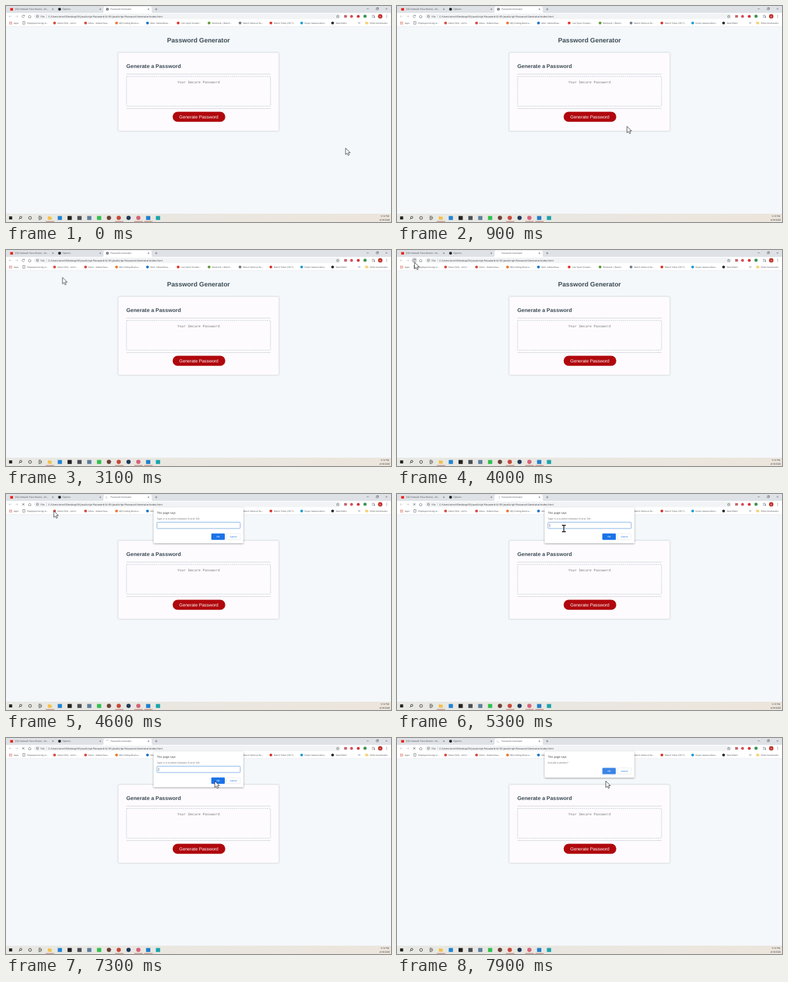
Write an HTML page that moves like this. It is 600x338 px and loops after 8 s.

```html
<!DOCTYPE html>
<html lang="en">
<head>
<meta charset="utf-8">
<title>Password Generator</title>
<style>
html, body { margin: 0; width: 100%; height: 100%; overflow: hidden; background: #f4f8fb; }
svg { display: block; width: 100vw; height: 100vh; text-rendering: geometricPrecision; }
text { font-family: "Open Sans", "Noto Sans", sans-serif; fill: #4a4d51; }
.tab text, .clock text { font-size: 3.45px; }
.marks text { font-size: 3.35px; }
.url { font-size: 3.95px; }
.page text { font-family: "Liberation Sans", Arial, sans-serif; fill: #3b4a54; text-anchor: middle; }
.line { fill: none; stroke: #5f6368; stroke-width: .6; }
.box { filter: drop-shadow(0 1px 1.5px rgba(0, 0, 0, .35)); }
.dialog .head { font-size: 4.4px; fill: #333; }
.dialog .body { font-size: 3.85px; fill: #6a6d71; }
.dialog .btn { font-size: 3.3px; font-weight: 600; text-anchor: middle; fill: #1a73e8; }
.dialog .ok { fill: #fff; }

.cursor { animation: move 8s linear infinite; }
.arrow, .beam, .hover, .reload, .stop, .favicon, .wait, .ask, .confirm, .caret {
  animation: 8s step-end infinite;
}
.arrow { animation-name: arrow; }
.beam { animation-name: beam; }
.hover { animation-name: hover; }
.reload { animation-name: reload; }
.stop, .wait { animation-name: loading; }
.favicon { animation-name: favicon; }
.ask { animation-name: ask; }
.confirm { animation-name: confirm; }
.caret { animation-name: caret; }
.spin { transform-origin: 158px 5px; animation: spin 1.6s linear infinite; }

@keyframes move {
  0% { transform: translate(529px, 222px); }
  3.75%, 6.25% { transform: translate(470px, 210px); }
  11.25% { transform: translate(358px, 188px); }
  13.75%, 15% { transform: translate(346px, 160px); }
  20%, 21.25% { transform: translate(283px, 146px); }
  27.5% { transform: translate(196px, 107px); }
  28.75%, 31.25% { transform: translate(163px, 77px); }
  35%, 36.25% { transform: translate(112px, 52px); }
  45%, 56.25% { transform: translate(27px, 19px); }
  62.5%, 80% { transform: translate(260px, 54px); }
  90%, 100% { transform: translate(325px, 67px); }
}
@keyframes beam {
  0%, 28.125%, 81.25%, 100% { opacity: 0; }
  18.75%, 61.875% { opacity: 1; }
}
@keyframes arrow {
  0%, 28.125%, 81.25%, 100% { opacity: 1; }
  18.75%, 61.875% { opacity: 0; }
}
@keyframes hover { 0%, 57%, 100% { opacity: 0; } 44% { opacity: 1; } }
@keyframes reload { 0% { opacity: 1; } 53.75%, 100% { opacity: 0; } }
@keyframes loading { 0% { opacity: 0; } 53.75%, 100% { opacity: 1; } }
@keyframes favicon { 0% { opacity: 1; } 47.5%, 100% { opacity: 0; } }
@keyframes ask { 0%, 93%, 100% { opacity: 0; } 53.75% { opacity: 1; } }
@keyframes confirm { 0% { opacity: 0; } 93%, 100% { opacity: 1; } }
@keyframes caret {
  0%, 63.125%, 76.375%, 89.625%, 100% { opacity: 1; }
  56.5%, 69.75%, 83% { opacity: 0; }
}
@keyframes spin { to { transform: rotate(-360deg); } }
</style>
</head>
<body>
<svg viewBox="0 0 600 338">
  <defs>
    <path id="close" class="line" d="M-1.2-1.2 1.2 1.2M1.2-1.2-1.2 1.2"/>
    <linearGradient id="bar"><stop stop-color="#e8e8e4"/><stop offset="1" stop-color="#ece5dc"/></linearGradient>
  </defs>
  <rect width="600" height="338" fill="#f4f8fb"/>

  <g class="page">
    <text x="300" y="57" font-size="10" font-weight="700">Password Generator</text>
    <rect x="175" y="73" width="250" height="122.5" rx="1.5" fill="#fdfbfe" stroke="#dfe3e7" stroke-width=".5"
      style="filter: drop-shadow(0 .8px 1.2px rgba(0, 0, 0, .2))"/>
    <text x="187.5" y="96.6" font-size="8.4" font-weight="700" style="text-anchor: start">Generate a Password</text>
    <path d="M187.5 106.5H412.5M187.5 160.5H412.5" stroke="#d0d2d5" stroke-width=".8"/>
    <rect x="187.8" y="110.2" width="224.4" height="46.6" rx="1" fill="none" stroke="#b3c4c9" stroke-width=".8" stroke-dasharray="2 1.2"/>
    <text x="300" y="120.8" font-size="5.5" style="font-family: 'Liberation Mono', monospace; fill: #777">Your Secure Password</text>
    <rect x="259.7" y="165.5" width="82" height="15.8" rx="7.9" fill="#af080d"/>
    <text x="300.5" y="175.7" font-size="6.9" style="fill: #fff">Generate Password</text>
  </g>

  <g class="tab">
    <rect width="600" height="11" fill="#dee1e6"/>
    <path d="M150 11Q152 11 152 8.5V3Q152 .8 154.5 .8H224.5Q227 .8 227 3V8.5Q227 11 229 11Z" fill="#fff"/>
    <rect x="6.5" y="3.2" width="4.5" height="4" fill="#e5281f"/>
    <text x="14" y="6.4">(58) Sidewalk Pizza Review - Arl...</text>
    <use href="#close" x="73" y="5"/>
    <circle cx="83.5" cy="5" r="2.3" fill="#24292e"/>
    <text x="88" y="6.4">Options</text>
    <use href="#close" x="147" y="5"/>
    <g class="favicon">
      <circle cx="158" cy="5" r="2.2" fill="#5f6368"/>
      <path d="M156.6 4.4H159M157.4 6H159.4" stroke="#fff" stroke-width=".6"/>
    </g>
    <g class="wait"><path class="line spin" style="stroke: #8b9197" d="M156 5A2 2 0 0 0 159.4 6.4"/></g>
    <text x="163" y="6.4">Password Generator</text>
    <use href="#close" x="222" y="5"/>
    <path class="line" d="M232.3 5H235.9M234.1 3.2V6.8M562 4.5H565.4M577 3.4H579.6V6H577ZM577.8 3.4V2.6H580.4V5.2H579.6"/>
    <use href="#close" x="593" y="4.5"/>
  </g>

  <g>
    <rect y="10.8" width="600" height="21.2" fill="#fff"/>
    <path d="M0 32H600" stroke="#dfe2e5" stroke-width=".5"/>
    <rect x="43.5" y="12" width="478" height="8.6" rx="4.3" fill="#f1f3f4"/>
    <g class="line">
      <path stroke="#b9bcc0" d="M8.6 16.2H4.8M6.4 14.5 4.7 16.2 6.4 17.9M14.7 16.2H18.5M16.9 14.5 18.6 16.2 16.9 17.9"/>
      <path d="M34.7 16.4 37 14.2 39.3 16.4M35.4 16V18.4H38.6V16"/>
      <circle cx="49" cy="16.2" r="1.8"/>
      <path d="M49 16V17.2M49 15V15.4"/>
      <path d="M63.2 14V18.5" stroke="#c4c7ca"/>
      <path d="M517 14.1 517.7 15.6 519.2 15.7 518 16.8 518.4 18.3 517 17.5 515.6 18.3 516 16.8 514.8 15.7 516.3 15.6Z"/>
    </g>
    <circle class="hover" cx="27" cy="16.2" r="4.4" fill="#d9dbde"/>
    <g class="reload"><path class="line" d="M28.7 17.2A2 2 0 1 1 28.5 14.9M28.9 13.8V15.4H27.3"/></g>
    <g class="stop"><path class="line" style="stroke-width: .8" d="M25.3 14.5 28.7 17.9M28.7 14.5 25.3 17.9"/></g>
    <text class="url" x="54" y="17.7">File</text>
    <text class="url" x="66" y="17.7" style="fill: #303337">C:/Users/omril/Desktop/03-JavaScript-Password-G/-05-JavaScript-Password-Generator/index.html</text>
    <rect x="527" y="14.2" width="4.4" height="4" fill="#c4686a"/>
    <circle cx="538.5" cy="16.2" r="2.2" fill="#d9475c"/>
    <circle cx="549" cy="16.2" r="2.3" fill="#d8343a"/>
    <circle cx="559.5" cy="16" r="2.5" fill="#3d9555"/>
    <path class="line" d="M570.3 14.5H573M570.3 16.2H572.2M570.3 17.9H572M574 14V17.2"/>
    <circle cx="574" cy="17.5" r=".9" fill="#5f6368"/>
    <circle cx="583.2" cy="16.2" r="3.4" fill="#c0322b"/>
    <text x="583.2" y="17.6" font-size="3.8" text-anchor="middle" style="fill: #fff">V</text>
    <path d="M593.2 14V18.8" stroke="#5f6368" stroke-width=".9" stroke-dasharray=".9 .9"/>
  </g>

  <g class="marks">
    <path d="M5 25.1H9.4M5 26.7H9.4M5 28.3H9.4" stroke="#d65548" stroke-width="1" stroke-dasharray="1 .7"/>
    <rect class="line" x="26.2" y="24.6" width="3.2" height="4"/>
    <path d="M548.9 25.2 550.2 26.5 548.9 27.8M550.6 25.2 551.9 26.5 550.6 27.8" class="line"/>
    <path d="M559.8 24.5H561.6L562.2 25.1H564.6V28.6H559.8Z" fill="#f5d277"/>
    <text x="12" y="27.8">Apps</text>
    <text x="33" y="27.8">Employee-facing re...</text>
    <text x="567" y="27.8">Other bookmarks</text>
  </g>

  <g class="tasks">
    <rect y="325" width="600" height="13" fill="url(#bar)"/>
    <rect x="4.8" y="329.2" width="4.8" height="4.8" fill="#222"/>
    <g fill="none" stroke="#222" stroke-width=".8">
      <circle cx="23" cy="330.8" r="1.7"/>
      <path d="M21.8 332 20 334"/>
      <circle cx="37.5" cy="331.6" r="2.2"/>
      <path d="M51.2 330.2H54V333H51.2ZM55.4 329.6V333.6M50.8 328.9H54.4M50.8 334.3H54.4" stroke-width=".6"/>
    </g>
    <path d="M65.3 329H67.6L68.3 329.8H71.3V334.4H65.3Z" fill="#f2c14b"/>
    <path d="M62 337.2H75M170 337.2H183M200 337.2H213M215.5 337.2H228.5" stroke="#b86a60" stroke-width=".9"/>
  </g>

  <g class="clock" text-anchor="end">
    <text x="597" y="330.4" style="fill: #222">3:16 PM</text>
    <text x="598.3" y="336.2" style="fill: #222">4/18/2020</text>
  </g>

  <g class="dialog ask">
    <rect class="box" x="230" y="21" width="140" height="56" rx="1.5" fill="#fff"/>
    <text class="head" x="235" y="31.3">This page says</text>
    <text class="body" x="235" y="40">Type in a number between 8 and 128.</text>
    <rect x="235.2" y="44.2" width="129.8" height="9.8" rx="1" fill="#fff" stroke="#86b1e4" stroke-width="1"/>
    <path class="caret" d="M238 46.6V51.8" stroke="#444" stroke-width=".6"/>
    <rect x="320" y="61.8" width="21" height="10" rx="1.2" fill="#1a73e8"/>
    <text class="btn ok" x="330.5" y="68">OK</text>
    <rect x="343.7" y="62" width="21.3" height="9.6" rx="1.2" fill="#fff" stroke="#dadce0" stroke-width=".5"/>
    <text class="btn" x="354.3" y="68">Cancel</text>
  </g>
  <g class="dialog confirm">
    <rect class="box" x="230" y="21" width="140" height="41" rx="1.5" fill="#fff"/>
    <text class="head" x="235" y="31.3">This page says</text>
    <text class="body" x="235" y="40">Include numbers?</text>
    <rect x="320" y="46.7" width="21" height="10" rx="1.2" fill="#3b84e6" stroke="#a9c8f2" stroke-width=".6"/>
    <text class="btn ok" x="330.5" y="52.9">OK</text>
    <rect x="343.7" y="46.9" width="21.3" height="9.6" rx="1.2" fill="#fff" stroke="#dadce0" stroke-width=".5"/>
    <text class="btn" x="354.3" y="52.9">Cancel</text>
  </g>

  <g class="cursor">
    <path class="arrow" d="M.4 .4V10.4L2.7 8.3 4.3 11.8 6.1 11 4.5 7.6H7.7Z" fill="#fff" stroke="#333" stroke-width=".8"/>
    <g class="beam" fill="none">
      <path d="M-3-5H3M-3 5H3M0-5V5" stroke="#fff" stroke-width="2"/>
      <path d="M-3-5H3M-3 5H3M0-5V5" stroke="#222" stroke-width="1.4"/>
    </g>
  </g>
</svg>
<script>
const add = (parent, tag, attrs, label = "") => {
  const el = document.createElementNS("http://www.w3.org/2000/svg", tag);
  for (const key in attrs) el.setAttribute(key, attrs[key]);
  el.textContent = label;
  parent.append(el);
};

// icon centre, text start, colour, label
const marks = [
  [75.7, 80, "#d5493e", "Inbox (342) - omril..."],
  [124, 128.3, "#d5493e", "Inbox - belworthaa..."],
  [172.3, 176.3, "#ee7433", "MQ-Coding-Bootca..."],
  [220.5, 225, "#1b73c4", "Mail - belworthaa..."],
  [268.3, 273, "#e0342c", "Live Sport Streami..."],
  [316.5, 321, "#5c9a35", "Reelnook | Watch..."],
  [364.8, 369.3, "#6d7a86", "Watch Harbour Ru..."],
  [412.8, 417.3, "#d5332b", "Watch Tollan (2017)..."],
  [460.8, 465.3, "#1f9bd8", "https://www.ozdoro..."],
  [509, 514, "#26282b", "Matchfield"]
];
const bar = document.querySelector(".marks");
for (const [cx, x, fill, label] of marks) {
  add(bar, "circle", { cx, cy: 26.6, r: 2.2, fill });
  add(bar, "text", { x, y: 27.8 }, label);
}

const apps = ["#2183d2", "#222", "#4a4f55", "#5d7f9f", "#2fc04f", "#6a3f3a",
  "#c8493b", "#1d3b5c", "#d7627a", "#1f7fcb", "#19a5ad"];
const tasks = document.querySelector(".tasks");
apps.forEach((fill, i) => {
  const cx = 83.9 + i * 15.3;
  if ([5, 6, 7, 8].includes(i)) add(tasks, "circle", { cx, cy: 331.6, r: 3.3, fill });
  else add(tasks, "rect", { x: cx - 3.3, y: 328.6, width: 6.6, height: 6.2, fill });
});
</script>
</body>
</html>
```
